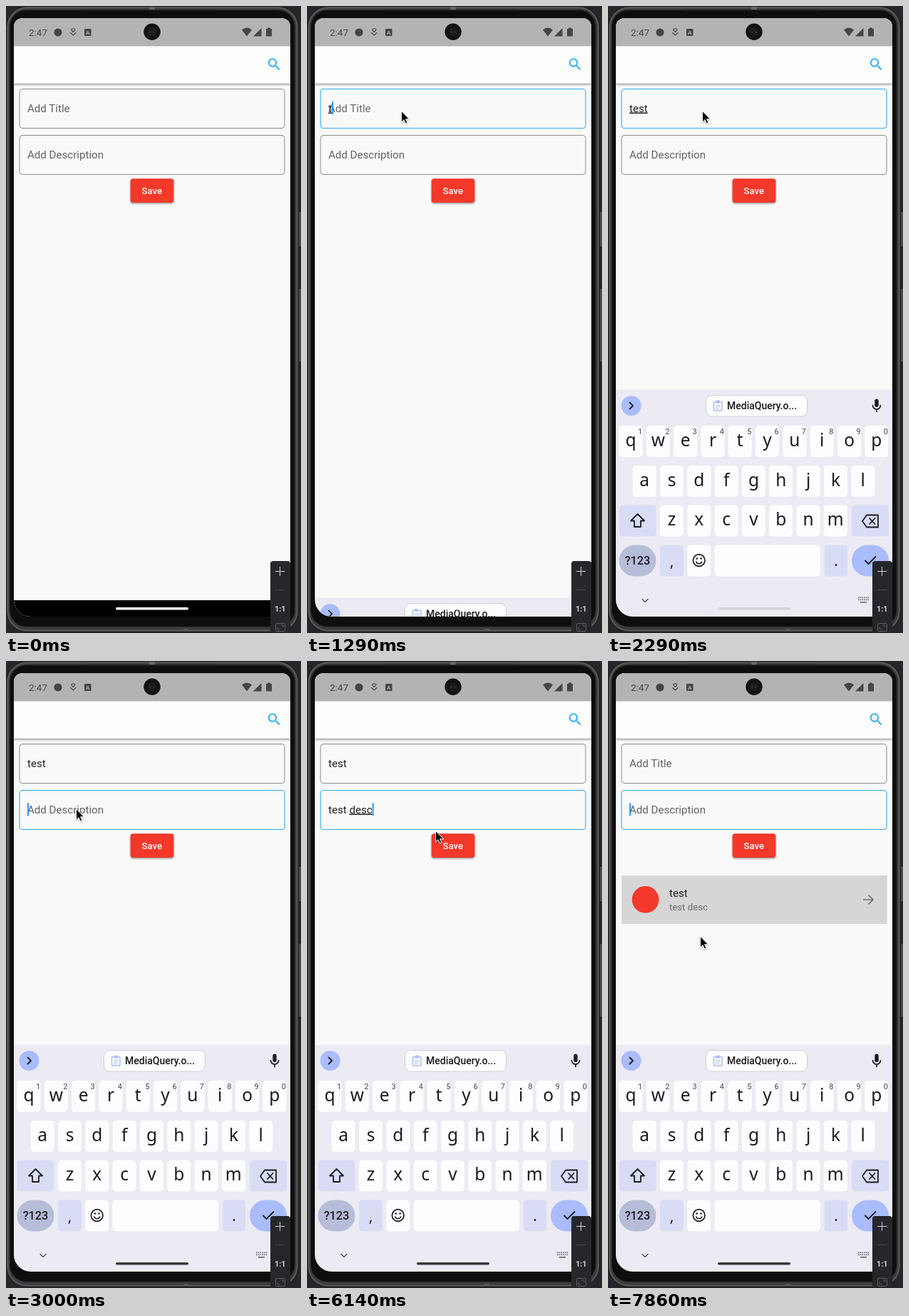
Recreate the animation shown at these times as an HTML page. Size 414 px wide and 880 px high, loop 8 s.

```html
<!DOCTYPE html>
<html lang="en">
<head>
<meta charset="utf-8">
<title>Add note</title>
<style>
html, body { margin: 0; width: 100%; height: 100%; overflow: hidden; background: #24262a; }
svg { display: block; font-family: Roboto, "Noto Sans", sans-serif; }
text { white-space: pre; }
.u { text-decoration: underline; text-decoration-thickness: 1px; }
.line { fill: none; stroke-linecap: round; stroke-linejoin: round; }
.sharp { stroke-linecap: butt; stroke-linejoin: miter; }
.mid { text-anchor: middle; }
.key { text-anchor: middle; font-family: "Noto Sans", Roboto, sans-serif; }
</style>
</head>
<body>
<svg id="stage" width="414" height="880" viewBox="0 0 414 880"></svg>
<script>
const LOOP = 8000;
const rect = (x, y, w, h, r, fill, more = '') =>
  `<rect x="${x}" y="${y}" width="${w}" height="${h}" rx="${r}" fill="${fill}" ${more}/>`;
const circle = (x, y, r, fill, more = '') => `<circle cx="${x}" cy="${y}" r="${r}" fill="${fill}" ${more}/>`;
const label = (s, x, y, size, fill, more = '') =>
  `<text x="${x}" y="${y}" font-size="${size}" fill="${fill}" ${more}>${s}</text>`;
const line = (d, stroke, w = 1.5, kind = '') =>
  `<path class="line ${kind}" d="${d}" stroke="${stroke}" stroke-width="${w}"/>`;
const shape = (d, fill, more = '') => `<path d="${d}" fill="${fill}" ${more}/>`;

function phone() {
  return rect(408, 288, 8, 50, 1, '#4a4a4a', 'stroke="#141414"') +
    rect(408, 396, 8, 104, 1, '#4a4a4a', 'stroke="#141414"') +
    rect(0.5, 0.5, 410, 878, 29, '#454545', 'stroke="#1a1a1a"') +
    rect(2.5, 2.5, 406, 874, 27, '#3c3c3c', 'stroke="#5c5c5c" stroke-width="1.5"') +
    rect(5.5, 6, 399.5, 865, 23, '#0e0e0e', 'stroke="#1c1c1c"') +
    rect(109, 4, 186, 2, 1, '#2f2f2f') + rect(201, 1, 8, 4, 1, '#6a6a6a') +
    rect(249, 874, 7, 3, 1, '#5a5a5a');
}

function statusBar() {
  const c = '#454545';
  return rect(11, 17, 388, 39.5, 0, '#b3b3b3') +
    label('2:47', 32, 41.7, 13.5, c) +
    circle(73, 37, 5.6, c) +
    line('M94.300 36.500l-2.300-2.300a1.400 1.400 0 0 1 2.300-1.800a1.400 1.400 0 0 1 2.300 1.800zM90.500 37.500l3.800 3.500l3.800-3.500', c, 1.1) +
    rect(110, 32, 9.5, 10, 1, c) + label('A', 114.7, 40, 8, '#b3b3b3', 'class="mid" font-weight="700"') +
    shape('M338 42.500L331 33.500Q338 27.500 345 33.500Z', c) +
    shape('M358.500 31V42.500H347Z', c) +
    shape('M365 32h2v-1.500h4v1.500h2v10.500h-8z', c) +
    circle(205, 36.3, 11.7, '#121212') + circle(205, 36.3, 6, '#1c1c1c') +
    circle(202, 36.5, 1, '#444') + circle(207.5, 36.5, 1, '#3a3a3a');
}

function field(id, y) {
  return rect(19, y, 372, 55, 4, 'none', `id="${id}Box"`) +
    `<text id="${id}Hint" x="30" y="${y + 32}" font-size="15.1" fill="#616161"></text>` +
    `<text id="${id}Text" x="30" y="${y + 32}" font-size="15.1" fill="#212121"></text>` +
    rect(30, y + 17.5, 1.9, 18.5, 0.9, '#2196f3', `id="${id}Caret"`);
}

function app() {
  const search = 'M15.500 14h-.8l-.3-.3A6.500 6.500 0 1 0 13.700 14.400l.3.3v.8l5 5L20.500 19zM9.500 14a4.500 4.500 0 1 1 0-9a4.500 4.500 0 0 1 0 9z';
  return rect(11, 17, 388, 840, 0, '#f9f9f9') +
    rect(11, 50, 388, 58.5, 0, '#fefefe', 'filter="url(#barShadow)"') +
    statusBar() +
    shape(search, '#29b0f5', 'transform="translate(365 70.600) scale(.944)"') +
    field('title', 116.5) + field('desc', 181.5) +
    rect(174.600, 242.3, 60.8, 33.8, 3.8, '#f4382c', 'filter="url(#buttonShadow)"') +
    label('Save', 204.8, 264, 13.2, '#fff', 'class="mid" font-weight="500"') +
    '<g id="item">' + rect(19, 301, 372.500, 68, 0, '#d6d6d6') +
    circle(52.500, 334.800, 18.900, '#f4382c') +
    label('test', 86, 331.300, 15.100, '#1e1e1e') + label('test desc', 86, 350, 13.200, '#6c6c6c') +
    line('M358 335H371.500M365.500 328.500L372 335L365.500 341.500', '#6f6f6f', 1.6, 'sharp') + '</g>' +
    rect(11, 834, 388, 23, 0, '#000');
}

function keyboard() {
  const ink = '#1b1b20', soft = '#d9dcf5', blue = '#a9bcfd', pitch = 38.32;
  const key = (x, y, w, fill, r = 5) => rect(x, y, w, 44, r, fill);
  const rows = [['qwertyuiop', 32, 589], ['asdfghjkl', 51.2, 645], ['zxcvbnm', 89.4, 700.5]];
  let s = rect(11, 538.5, 388, 320, 0, '#ecebf3');
  s += circle(32.500, 561, 14, blue) + line('M30.500 556.500l4.500 4.500l-4.500 4.500', ink, 1.8);
  s += rect(137.500, 546.500, 142, 29.500, 8, '#fdfdff', 'stroke="#cdced9"');
  s += rect(148.500, 555.500, 11.500, 12.500, 1.500, 'none', `stroke="${blue}" stroke-width="1.5"`) +
    rect(151.500, 553.500, 5.500, 4, 1, blue) + line('M151.500 560.500h5.500M151.500 563h5.500M151.500 565.300h3.500', blue, 1);
  s += label('MediaQuery.o...', 167, 566, 14, ink, 'font-weight="500"');
  s += rect(374.300, 551.500, 5.400, 11.500, 2.700, ink) + line('M371.500 560.500a5.500 5.500 0 0 0 11 0M377 566.500v3', ink, 1.700);

  rows.forEach(([letters, x0, y], row) => [...letters].forEach((c, i) => {
    const x = x0 + i * pitch;
    s += key(x - 16.5, y, 33, '#fdfdff') + label(c, x, y + 28.500, 24.500, ink, 'class="key"');
    if (!row) s += label((i + 1) % 10, x + 13, y + 12.300, 11, '#45454d', 'class="mid"');
  }));

  s += key(15.500, 700.500, 52, soft) + line('M41.500 713l-9.500 9.500h5v8.500h9v-8.500h5z', ink, 1.8);
  s += key(342, 700.500, 52, soft) + line('M357 723l6-8.500h16v17h-16zM367 719l7.500 8M374.500 719l-7.500 8', ink, 1.8);
  s += key(15.500, 756.500, 52, '#b6bdd8', 22) + label('?123', 41.500, 783.700, 16.300, ink, 'class="mid" font-weight="500"');
  s += key(73, 756.500, 33, soft) + label(',', 89.500, 787, 21, ink, 'class="key"');
  s += key(111.200, 756.500, 33, '#fdfdff') + circle(127.700, 778, 8.300, 'none', `stroke="${ink}" stroke-width="1.700"`) +
    circle(124.800, 775.500, 1.300, ink) + circle(130.600, 775.500, 1.300, ink) + line('M123.700 780a4.300 4.300 0 0 0 8 0', ink, 1.600);
  s += key(149.500, 756.500, 148.500, '#fdfdff') + key(303.700, 756.500, 32.500, soft) + label('.', 320, 786, 21, ink, 'class="key"');
  s += key(342, 756.500, 52, blue, 22) + line('M361 778.500l4.500 4.500l10-10', ink, 1.800);
  s += line('M48 832.500l4 4l4-4', '#55565e', 1.500);
  for (let i = 0; i < 12; i++) s += rect(351 + (i % 6) * 2.700, 829.500 + (i / 6 | 0) * 3, 1.600, 1.600, 0, '#66676f');
  return s + rect(354, 836, 9, 1.600, 0, '#66676f');
}

function toolbar() {
  return rect(371, 779, 28, 110, 4, '#25272b') +
    line('M378 793.500h13M384.500 787v13', '#d0d1d4', 1, 'sharp') +
    line('M378 819.500h13', '#4a4c50', 1, 'sharp') +
    label('1:1', 384.800, 850, 11, '#d0d1d4', 'class="mid" font-weight="700"') +
    rect(378.500, 866.500, 13, 11, 1.500, 'none', 'stroke="#5b5d61"') +
    line('M381 872v3h3M389 872v-3h-3', '#5b5d61', 1);
}

const stage = document.getElementById('stage');
stage.innerHTML = `<defs>
  <clipPath id="screen"><path d="M11 29a12 12 0 0 1 12-12H387a12 12 0 0 1 12 12V833a24 24 0 0 1-24 24H35a24 24 0 0 1-24-24Z"/></clipPath>
  <filter id="barShadow" x="-5%" y="-20%" width="110%" height="150%"><feDropShadow dx="0" dy="1.800" stdDeviation="1.700" flood-opacity=".42"/></filter>
  <filter id="buttonShadow" x="-20%" y="-20%" width="140%" height="160%"><feDropShadow dx="0" dy="1.500" stdDeviation="1.200" flood-opacity=".4"/></filter>
  <filter id="pointerShadow" x="-50%" y="-50%" width="200%" height="200%"><feDropShadow dx="0" dy="1" stdDeviation="1" flood-opacity=".35"/></filter>
</defs>` + phone() +
  `<g clip-path="url(#screen)">${app()}<g id="keys">${keyboard()}</g>${rect(154, 844, 102, 3.600, 1.800, '#fff', 'id="pill"')}</g>` +
  toolbar() +
  `<g id="pointer" filter="url(#pointerShadow)">${shape('M.5 .5V16L4 12.700L6.400 18.100L8.900 17L6.600 11.800H11.500Z', '#000', 'stroke="#fff" stroke-width="1"')}</g>`;

const $ = id => document.getElementById(id);
const clamp = v => Math.max(0, Math.min(1, v));
const ramp = (t, start, length) => clamp((t - start) / length);
const smooth = v => v * v * (3 - 2 * v);
const mix = (a, b, k) => a.map((v, i) => v + (b[i] - v) * k);
const rgb = c => `rgb(${c.map(Math.round)})`;

const SAVED = 6790, FADE = 160;
const fields = [
  { id: 'title', hint: 'Add Title', full: 'test', focus: 970, blur: 2830, typed: [1285, 1420, 1565, 1705] },
  { id: 'desc', hint: 'Add Description', full: 'test desc', focus: 2830, blur: LOOP,
    typed: [3430, 3640, 3850, 4150, 4660, 4780, 4900, 5010, 5130] },
];
// time, x, y of the pointer tip
const path = [[140, 10, 870], [900, 132, 147], [2420, 132, 147], [2800, 98, 207], [5570, 98, 207],
  [6100, 180, 238], [6350, 180, 238], [6620, 203, 262], [6800, 203, 262], [7650, 129, 386]];

function pointerAt(t) {
  const i = path.findIndex(p => p[0] > t);
  if (i < 0) return path.at(-1).slice(1);
  const a = path[i - 1], b = path[i];
  return mix(a.slice(1), b.slice(1), smooth(ramp(t, a[0], b[0] - a[0])));
}

function drawField(f, t) {
  const focused = t >= f.focus && t < f.blur;
  const glow = ramp(t, f.focus, 120) - ramp(t, f.blur, 120);
  const box = $(f.id + 'Box'), text = $(f.id + 'Text'), hint = $(f.id + 'Hint'), caret = $(f.id + 'Caret');
  box.setAttribute('stroke', rgb(mix([140, 140, 140], [48, 172, 240], glow)));
  box.setAttribute('stroke-width', 1 + 0.1 * glow);

  const value = t < SAVED ? f.full.slice(0, f.typed.filter(k => k <= t).length) : '';
  const cut = focused ? value.lastIndexOf(' ') + 1 : value.length;
  text.innerHTML = `<tspan>${value.slice(0, cut)}</tspan><tspan class="u">${value.slice(cut)}</tspan>`;
  hint.textContent = f.hint;
  const gone = 1 - (1 - ramp(t, f.typed[0], FADE)) ** 1.5;
  hint.setAttribute('opacity', 1 - gone + ramp(t, SAVED, FADE));

  // The caret blinks every half second, counted from the last edit
  const last = Math.max(...[f.focus, ...f.typed, SAVED].filter(k => k <= t));
  caret.setAttribute('visibility', focused && (t - last) % 1000 < 500 ? 'visible' : 'hidden');
  caret.setAttribute('x', 30 + (value ? text.getComputedTextLength() : 0));
}

function draw(t) {
  fields.forEach(f => drawField(f, t));
  const rise = 1 - (1 - ramp(t, 1285, 135)) ** 2;
  $('keys').setAttribute('transform', `translate(0 ${320 * (1 - rise)})`);
  $('pill').setAttribute('fill', rgb(mix(mix([255, 255, 255], [211, 211, 216], rise), [55, 55, 60], ramp(t, 2430, 200))));
  $('item').setAttribute('visibility', t >= SAVED ? 'visible' : 'hidden');
  $('pointer').setAttribute('visibility', t >= path[0][0] ? 'visible' : 'hidden');
  if (t >= path[0][0]) $('pointer').setAttribute('transform', `translate(${pointerAt(t)})`);
}

const start = performance.now();
function tick() {
  draw((performance.now() - start) % LOOP);
  requestAnimationFrame(tick);
}
tick();
</script>
</body>
</html>
```
